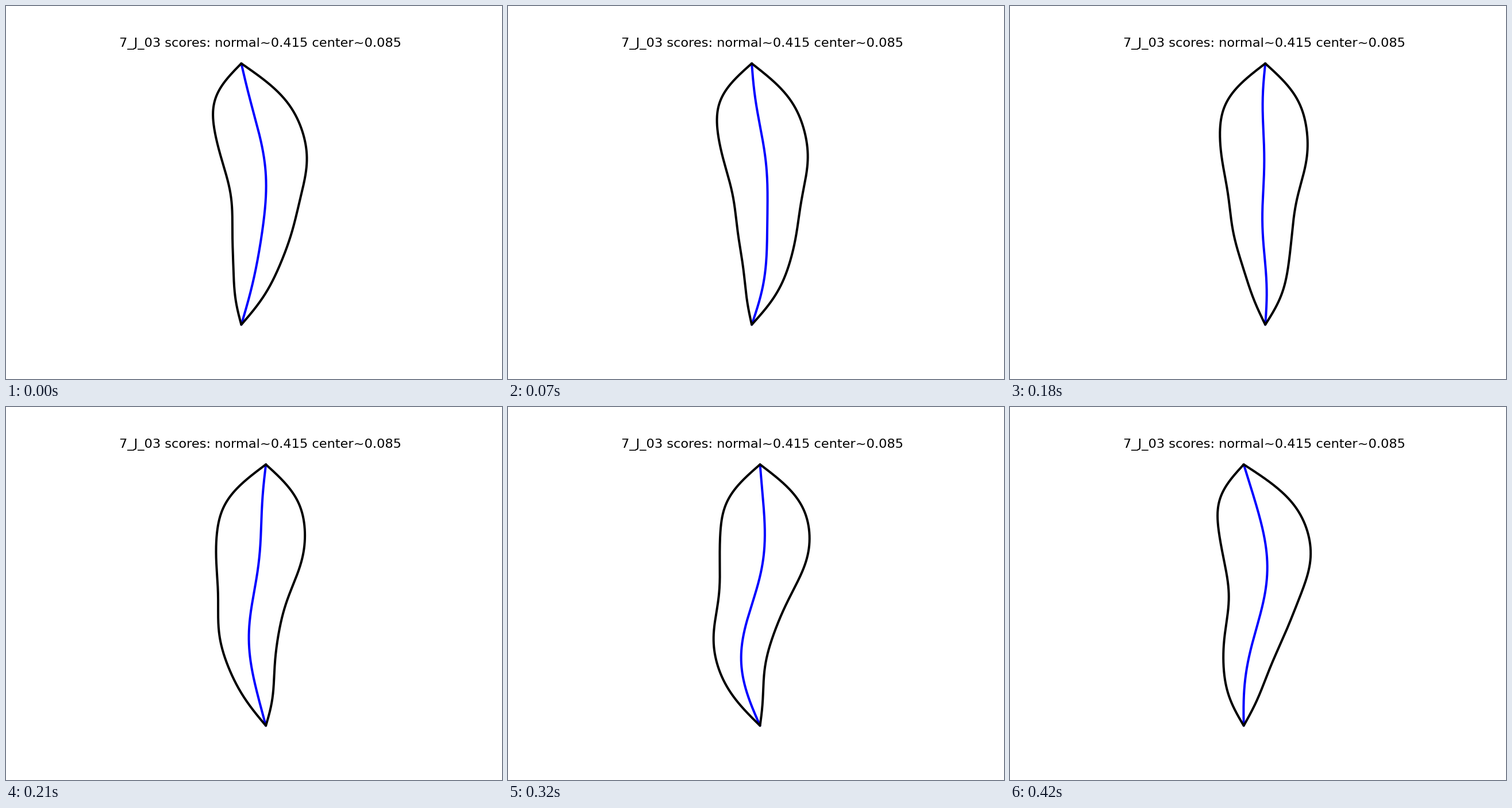
A matplotlib script that plays this animation: 863x649 px, repeating every 0.49 s.

```python
import numpy as np
import matplotlib.pyplot as plt
from matplotlib.animation import FuncAnimation

W, H, DPI = 863, 649, 100
TOP, BOTTOM = 100, 554.5
STEPS, STEP_MS = 7, 70
PX = 72 / DPI  # points per pixel

s = np.linspace(0, 1, 240)  # position from top tip to bottom tip
y = TOP + (BOTTOM - TOP) * s


def sines(*amps):
    """Sine series along s that vanishes at both tips."""
    return sum(a * np.sin(n * np.pi * s) for n, a in enumerate(amps, 1))


# Midline: a rest shape plus two harmonics of the loop, each with a tip offset.
rest = 427.5 + sines(10.6, 8.4, -2.1, -1.3)
cos1 = -19.1 + sines(31.6, -7.6, 0.9)
sin1 = 13 + sines(-6.4, -12, 2.8, -1.2)
cos2 = 1 + sines(-0.5, -0.6)
sin2 = -1.5 + sines(2.8, 0.6)
half_width = sines(74.8, 17.4, 13.2, 2.3, 1.9, 0.6, 1)


def pose(i):
    """Midline x and half-width at step i of the loop."""
    t = 2 * np.pi * i / STEPS
    mid = (rest + cos1 * np.cos(t) + sin1 * np.sin(t)
           + cos2 * np.cos(2 * t) + sin2 * np.sin(2 * t))
    pulse = 0.99 + 0.015 * np.cos(t - 4.4)
    return mid, half_width * pulse


fig = plt.figure(figsize=(W / DPI, H / DPI), dpi=DPI, facecolor="white")
ax = fig.add_axes([0, 0, 1, 1])
ax.set_xlim(0, W)
ax.set_ylim(H, 0)
ax.axis("off")

ax.text(442, 71.5, "7_J_03 scores: normal~0.415 center~0.085",
        family="DejaVu Sans", size=22.5 * PX, ha="center", va="baseline")

style = dict(lw=4 * PX, solid_joinstyle="round", solid_capstyle="round")
midline, = ax.plot([], [], color="#0000ff", **style)
outline, = ax.plot([], [], color="black", **style)


def draw(i):
    mid, half = pose(i)
    midline.set_data(mid, y)
    outline.set_data(np.r_[mid - half, (mid + half)[::-1]], np.r_[y, y[::-1]])
    return midline, outline


anim = FuncAnimation(fig, draw, frames=STEPS, interval=STEP_MS,
                     repeat=True, repeat_delay=0)
plt.show()
```
